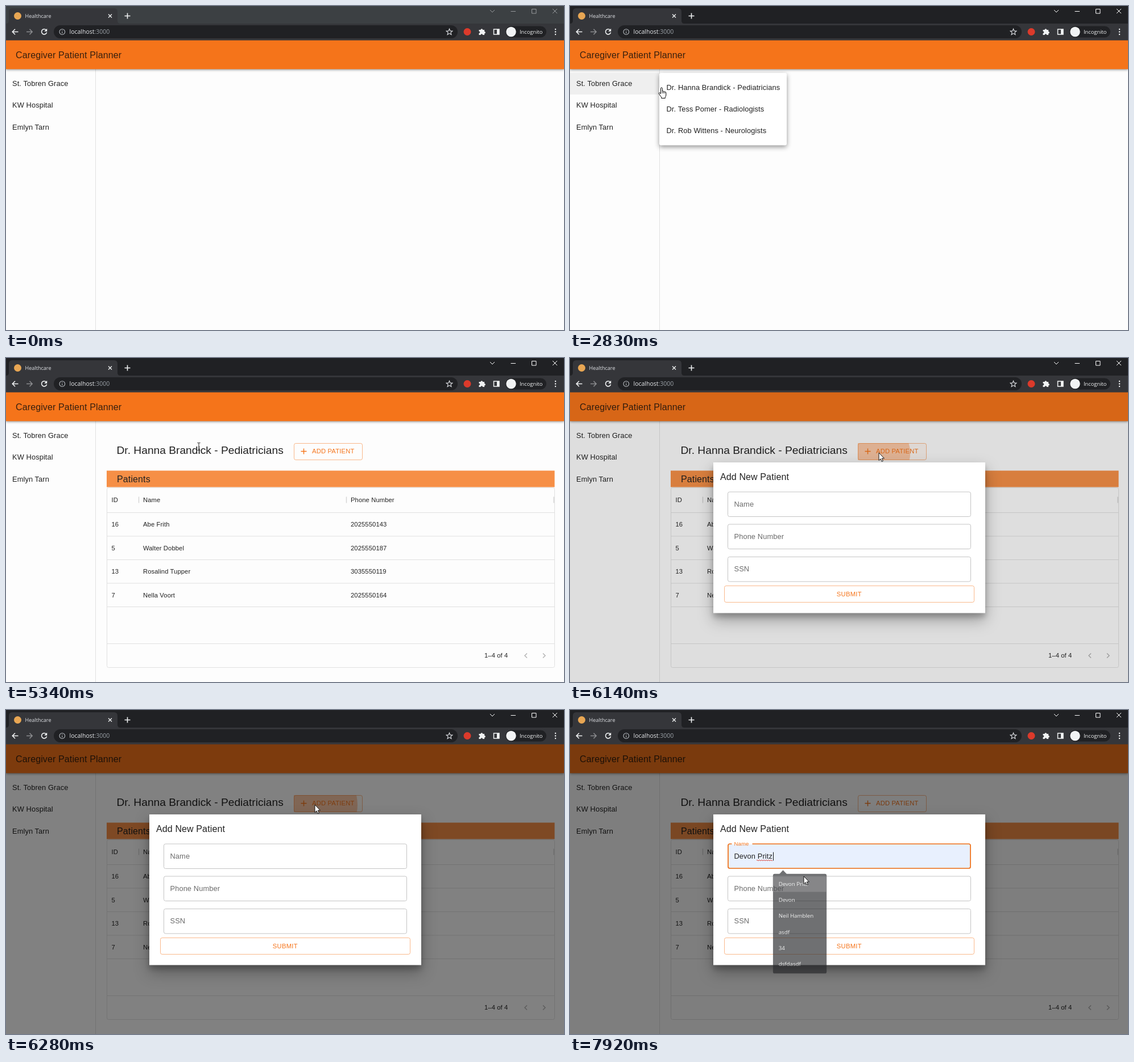
Write an HTML page that moves like this. It is 981 by 571 pixels and loops after 7.99 s.

```html
<!DOCTYPE html>
<html lang="en">
<head>
<meta charset="utf-8">
<title>Healthcare</title>
<style>
  html, body { margin: 0; width: 100%; height: 100%; overflow: hidden; background: #fdfdfd; }
  svg { display: block; width: 100%; height: 100%; font-family: "Liberation Sans", Arial, sans-serif; }
  text { white-space: pre; }
  .ui { font-family: "Open Sans", "Noto Sans", sans-serif; }
  .bar { filter: drop-shadow(0 1.5px 2px rgba(0,0,0,.45)); }
  .menu { filter: drop-shadow(0 3px 4px rgba(0,0,0,.42)); }
  .modal { filter: drop-shadow(0 7px 5px rgba(0,0,0,.2)) drop-shadow(0 11px 13px rgba(0,0,0,.3)); }
</style>
</head>
<body>
<svg id="stage" viewBox="0 0 981 571"></svg>
<script>
const LOOP = 7990, STEP = 66;
const ORANGE = '#f5741a', INK = '#212121';
const stage = document.getElementById('stage');

const rect = (x, y, w, h, fill, more = '') =>
  `<rect x="${x}" y="${y}" width="${w}" height="${h}" fill="${fill}" ${more}/>`;
const line = (d, color, w = 1, more = '') =>
  `<path d="${d}" fill="none" stroke="${color}" stroke-width="${w}" ${more}/>`;
const disc = (x, y, r, fill, more = '') => `<circle cx="${x}" cy="${y}" r="${r}" fill="${fill}" ${more}/>`;
const text = (x, y, size, str, fill = INK, more = '') =>
  `<text x="${x}" y="${y}" font-size="${size}" fill="${fill}" letter-spacing=".12" ${more}>${str}</text>`;
const ui = (x, y, size, str, fill) =>
  `<text class="ui" x="${x}" y="${y}" font-size="${size}" fill="${fill}">${str}</text>`;
const group = (id, body, more = '') => `<g id="${id}" ${more}>${body}</g>`;
const column = (items, x, y, pitch, size, fill) =>
  items.map((s, i) => text(x, y + i * pitch, size, s, fill)).join('');

const doctors = ['Dr. Hanna Brandick - Pediatricians', 'Dr. Tess Pomer - Radiologists', 'Dr. Rob Wittens - Neurologists'];
const patients = [
  ['16', 'Abe Frith', '2025550143'],
  ['5', 'Walter Dobbel', '2025550187'],
  ['13', 'Rosalind Tupper', '3035550119'],
  ['7', 'Nella Voort', '2025550164']
];
const fillName = 'Devon Pritz';
const hints = [fillName, 'Devon', 'Neil Hamblen', 'asdf', '34', 'dsfdasdf'];

function browser() {
  const white = '#f1f3f4';
  return rect(0, 0, 981, 60.5, '#35363a') +
    rect(0, 0, 981, 31, '#202124', 'id="strip"') +
    '<path d="M0 31Q5 31 5 26V10Q5 4 11 4H190Q196 4 196 10V26Q196 31 201 31Z" fill="#35363a"/>' +
    disc(20.5, 17.5, 6.5, '#e8a653') +
    ui(33.5, 20.8, 9.1, 'Healthcare', '#dfe1e5') +
    line('M180 14.5l6 6M186 14.5l-6 6', white, 1.3) +
    line('M208.5 17.5h10M213.5 12.5v10', white, 1.6) +
    group('controls', line('M851 7l4 4 4-4M887.5 9.5h8.5M924.5 5.5h7.5v7.5h-7.5zM961 5l8 8M969 5l-8 8', 'currentColor')) +
    line('M21.5 45.5H11.5M16 40.8l-4.7 4.7 4.7 4.7', white, 1.6) +
    line('M36 45.5H46M41.5 40.8l4.7 4.7-4.7 4.7', '#8b8c8f', 1.5) +
    line('M70.6 42.3A4.6 4.6 0 1 0 71.6 46.5', white, 1.6) +
    '<path d="M72.2 39.8v5h-5z" fill="#f1f3f4"/>' +
    rect(84, 34, 710, 23, '#202124', 'rx="11.5"') +
    line('M94 45.5a4.8 4.8 0 1 0 9.6 0a4.8 4.8 0 1 0-9.6 0M98.8 45v3.3M98.8 42.6v1.2', '#b4b8bd', 1.1) +
    ui(111.5, 49.2, 10.5, 'localhost<tspan fill="#9aa0a6">:3000</tspan>', '#e8eaed') +
    line('M779.5 40.3l1.5 3.6 3.9.3-3 2.5 1 3.8-3.4-2.1-3.4 2.1 1-3.8-3-2.5 3.9-.3z', '#dfe1e5', 1.1) +
    disc(811, 45.5, 6.5, '#dc3a2b') +
    '<path d="M831.5 42h3a1.8 1.8 0 0 1 3.6 0h3v3a1.8 1.8 0 0 1 0 3.6v2.4h-3a1.8 1.8 0 0 0-3.6 0h-3v-3a1.8 1.8 0 0 0 0-3.6z" fill="#f1f3f4"/>' +
    line('M857.5 41h9.5v9h-9.5z', white, 1.5) + rect(863, 41, 4, 9, white) +
    rect(878, 35.5, 72, 20, '#202124', 'rx="10"') + disc(888, 45.5, 8.7, white) +
    ui(903, 48.9, 9.3, 'Incognito', white) +
    [41, 45.5, 50].map(y => disc(966, y, 1.2, white)).join('');
}

function sidebar() {
  return rect(157, 111, 1, 460, '#e0e0e0') +
    rect(0, 112, 157, 44, '#000', 'id="sideHover"') +
    disc(97, 138, 0, '#000', 'id="sideRipple" opacity=".1" clip-path="url(#sideClip)"') +
    column(['St. Tobren Grace', 'KW Hospital', 'Emlyn Tarn'], 11, 141, 38.3, 12.8);
}

function table() {
  const rules = [272.5, 314, 355.5, 397, 438.5, 503.5].map(y => `M177 ${y}H964`).join('');
  const cols = [185.5, 241, 606];
  const row = (cells, y) => cells.map((s, i) => text(cols[i], y, 11.2, s)).join('');
  return text(194.5, 169, 19.2, doctors[0], INK, 'style="letter-spacing:0"') +
    rect(506.5, 150.5, 120, 29, ORANGE, 'rx="3" fill-opacity=".05" id="addHover"') +
    disc(547, 167, 0, ORANGE, 'id="addRipple" clip-path="url(#addClip)"') +
    rect(506.5, 150.5, 120, 29, 'none', `rx="3" stroke="${ORANGE}" stroke-opacity=".5"`) +
    line('M518.5 164.5h10M523.5 159.5v10', ORANGE, 1.4) +
    text(538, 168.2, 11.2, 'ADD PATIENT', ORANGE, 'style="letter-spacing:.2px"') +
    rect(177.5, 228.5, 787, 317, 'none', 'stroke="#e0e0e0" rx="3"') +
    rect(177, 198.5, 787.5, 29, '#f68f46') +
    text(195, 218.5, 16, 'Patients') +
    line(rules, '#e0e0e0') +
    line('M233.5 244.5v11M598.5 244.5v11M963 244.5v11', '#d4d4d4', 1.4) +
    row(['ID', 'Name', 'Phone Number'], 253.7) +
    patients.map((p, i) => row(p, 297 + i * 41.5)).join('') +
    text(841, 528, 11.2, '1–4 of 4') +
    line('M916 520.5l-4 4 4 4M944 520.5l4 4-4 4', '#b5b5b5', 1.5);
}

function menu() {
  return rect(157, 118, 224, 127.5, '#fff', 'rx="3" class="menu"') +
    rect(157, 124, 224, 38.3, '#000', 'id="menuHover"') +
    disc(248, 148, 0, '#000', 'id="menuRipple" opacity=".1" clip-path="url(#menuClip)"') +
    column(doctors, 169.5, 147.5, 38.2, 12.8);
}

function dialog() {
  const field = y => rect(277.5, y, 427, 43.5, 'none', 'rx="3" stroke="#c4c4c4"');
  const hintRows = hints.map((s, i) => ui(366, 308.8 + i * 28.7, 9.9, s, '#eceded')).join('');
  return rect(252, 184, 478, 265.5, '#fff', 'class="modal"') +
    text(264, 215, 16, 'Add New Patient') +
    field(236) + field(293) + field(350.5) +
    column(['Phone Number', 'SSN'], 288.5, 319, 57.3, 12.8, '#6b6b6b') +
    rect(271.5, 401.5, 439, 29, 'none', `rx="3" stroke="${ORANGE}" stroke-opacity=".5"`) +
    text(490.8, 419.7, 11.2, 'SUBMIT', ORANGE, 'text-anchor="middle" style="letter-spacing:.32px"') +
    rect(278, 236, 426, 43, '#e8f0fe', 'id="autofill"') +
    group('focusBox', rect(278, 236, 426, 43, 'none', `rx="3" stroke="${ORANGE}" stroke-width="1.7"`) +
      rect(284.5, 234.5, 36, 2.6, '#fff', 'id="notch"')) +
    '<text id="label" font-size="12.8" letter-spacing=".12">Name</text>' +
    text(288.5, 262, 12.8, fillName, INK, 'id="value"') +
    line('M328 265' + 'q1-1.6 2 0t2 0'.repeat(7), '#d93025', .9, 'id="spell"') +
    rect(0, 250.5, 1, 15, '#111', 'id="caret"') +
    group('hints',
      '<path d="M367 288l7-7.5 7 7.5z" fill="#28292c"/>' + rect(356, 287, 96, 179, '#28292c', 'rx="3"') +
      rect(356, 290.5, 96, 29, '#4a4b4e', 'id="hintHover"') + hintRows);
}

const clip = (id, x, y, w, h) => `<clipPath id="${id}">${rect(x, y, w, h, '#000')}</clipPath>`;
stage.innerHTML =
  '<defs>' + clip('sideClip', 0, 118, 157, 38) + clip('addClip', 506, 150, 121, 30) + clip('menuClip', 157, 124, 224, 38) + '</defs>' +
  rect(0, 0, 981, 571, '#fdfdfd') +
  sidebar() +
  group('table', table()) +
  rect(0, 60, 981, 51.3, ORANGE, 'class="bar"') +
  text(17, 91.7, 16, 'Caregiver Patient Planner', '#38200f') +
  group('tip', rect(168, 127.5, 159.5, 20, '#6d6d6d', 'rx="3"') +
    text(174, 140.5, 8.4, 'St. Tobren Grace Fen Barro Hospital', '#fff', 'font-weight="bold" style="letter-spacing:0"')) +
  group('menu', menu()) +
  rect(0, 60, 981, 511, '#000', 'id="shade"') +
  group('dialog', dialog()) +
  browser() +
  disc(0, 0, 9.5, '#ffff1a', 'id="click" opacity=".75"') +
  group('cursor',
    group('arrow', '<path d="M0 0V13.6l3.1-2.9 2 4.7 2.2-.9-2-4.6H9.4z" fill="#fff" stroke="#000" stroke-width=".9"/>') +
    group('hand', '<path d="M-1.5 1.3a1.4 1.4 0 0 1 2.8 0V6q1.4-.8 2.2.5q1.5-.6 2.2.8q1.7-.4 2.1 1.2V13q0 1.8-1.5 3.6v1.9H-.3V16.8q-2-2.6-4.3-6.3q-.6-1.6.8-1.7q1 0 2.3 1.9z" fill="#fff" stroke="#000"/>' +
      line('M1.3 6v4M3.5 6.8V10M5.7 7.6V10', '#000', .8)) +
    group('beam', line('M-2.5-6.5h2l.5.5.5-.5h2M0-6V6M-2.5 6.5h2l.5-.5.5.5h2', '#222')));

const el = {};
stage.querySelectorAll('[id]').forEach(n => el[n.id] = n);
const set = (id, attrs) => { for (const k in attrs) el[id].setAttribute(k, attrs[k]); };
const show = (id, on) => el[id].style.display = on ? '' : 'none';
const fade = (id, v) => { show(id, v > 0); el[id].style.opacity = v; };

const ramp = (t, a, b) => Math.min(1, Math.max(0, (t - a) / (b - a)));
const smooth = p => p * p * (3 - 2 * p);
const easeOut = p => 1 - (1 - p) ** 3;

// Pointer stops: time, x, y
const stops = [
  [124, 857, 521], [500, 470, 335], [920, 185, 201], [1240, 97, 136], [2560, 97, 136],
  [2830, 161, 144], [3100, 214, 147], [3490, 248, 147], [4990, 248, 147], [5140, 268, 153],
  [5338, 339, 156], [5930, 543, 167], [6300, 543, 167], [6790, 418, 249], [7420, 418, 249], [7588, 411, 293]
];
const slope = (i, c) => (stops[i + 1][c] - stops[i][c]) / (stops[i + 1][0] - stops[i][0]);
function tangent(i, c) {
  if (i === 0 || i === stops.length - 1) return 0;
  const a = slope(i - 1, c), b = slope(i, c);
  return a * b <= 0 ? 0 : 2 * a * b / (a + b);
}
function pointer(t, c) {
  const last = stops.length - 1;
  if (t >= stops[last][0]) return stops[last][c];
  let i = 0;
  while (t >= stops[i + 1][0]) i++;
  const span = stops[i + 1][0] - stops[i][0], p = ramp(t, stops[i][0], stops[i + 1][0]), q = 1 - p;
  return stops[i][c] * q * q * (1 + 2 * p) + stops[i + 1][c] * p * p * (3 - 2 * p) +
    span * p * q * (q * tangent(i, c) - p * tangent(i + 1, c));
}

function cursorKind(t, x, y) {
  if (t < 2400) return x < 157 && y < 232 ? 'hand' : 'arrow';
  if (t < 4480) return x >= 157 ? 'hand' : 'arrow';
  if (t < 6060) return x > 506 ? 'hand' : x > 195 && x < 488 && y > 150 ? 'beam' : 'arrow';
  return y > 236 && y < 279 ? 'beam' : 'arrow';
}

function ripple(id, t, start, size, peak) {
  set(id, { r: size * easeOut(ramp(t, start, start + 400)) });
  fade(id, t < start ? 0 : peak * (1 - ramp(t, start + 300, start + 650)));
}

function update(t) {
  const x = pointer(t, 1), y = pointer(t, 2), kind = cursorKind(t, x, y);
  show('cursor', t >= 124);
  set('cursor', { transform: `translate(${x} ${y})` });
  ['arrow', 'hand', 'beam'].forEach(k => show(k, k === kind));
  show('click', [2300, 4340, 6000, 6985, 7780].some(c => t >= c && t < c + 125));
  set('click', { cx: x - 1, cy: y + (kind === 'hand' ? 2 : 0) });

  const active = t >= 2300;
  set('strip', { fill: active ? '#202124' : '#3c4043' });
  el.controls.style.color = active ? '#fff' : '#96999c';

  fade('sideHover', t < 4340 ? .036 * ramp(t, 1100, 1250) - .018 * ramp(t, 2600, 2750) : 0);
  ripple('sideRipple', t, 2300, 110, .1);
  fade('tip', ramp(t, 1240, 1440) - ramp(t, 2300, 2450));

  const open = easeOut(ramp(t, 2400, 2640));
  fade('menu', open - ramp(t, 4400, 4600));
  set('menu', { transform: `translate(157 118) scale(${.75 + .25 * open} ${.56 + .44 * open}) translate(-157 -118)` });
  fade('menuHover', .04 * ramp(t, 2830, 2980));
  ripple('menuRipple', t, 4340, 150, .1);

  show('table', t >= 4530);
  show('addHover', kind === 'hand' && t > 5000 || t > 6000 && t < 6300);
  ripple('addRipple', t, 6000, 74, .35);

  fade('shade', .5 * smooth(ramp(t, 6060, 6280)));
  show('dialog', t >= 6060);

  const focus = t >= 6979, lift = easeOut(ramp(t, 6979, 7140));
  show('focusBox', focus);
  show('notch', lift > .5);
  set('label', {
    transform: `translate(288.5 ${261.7 - 23.2 * lift}) scale(${1 - .25 * lift})`,
    fill: lift > .5 ? ORANGE : '#6b6b6b'
  });

  const preview = t >= 7510, chosen = t >= 7780;
  show('autofill', preview);
  show('value', preview);
  show('spell', chosen);
  show('caret', focus && (!preview || chosen));
  set('caret', { x: chosen ? 357 : 288.5 });
  show('hintHover', preview);
  const gone = ramp(t, 7842, 8052);
  fade('hints', focus ? 1 - gone : 0);
  set('hints', { transform: `translate(404 376.5) scale(${1 - .055 * gone}) translate(-404 -376.5)` });
}

const start = performance.now();
function tick(now) {
  const t = Math.max(0, now - start) % LOOP;
  update(Math.max(0, Math.floor((t + 8) / STEP) * STEP - 8));
  requestAnimationFrame(tick);
}
update(0);
requestAnimationFrame(tick);
</script>
</body>
</html>
```
